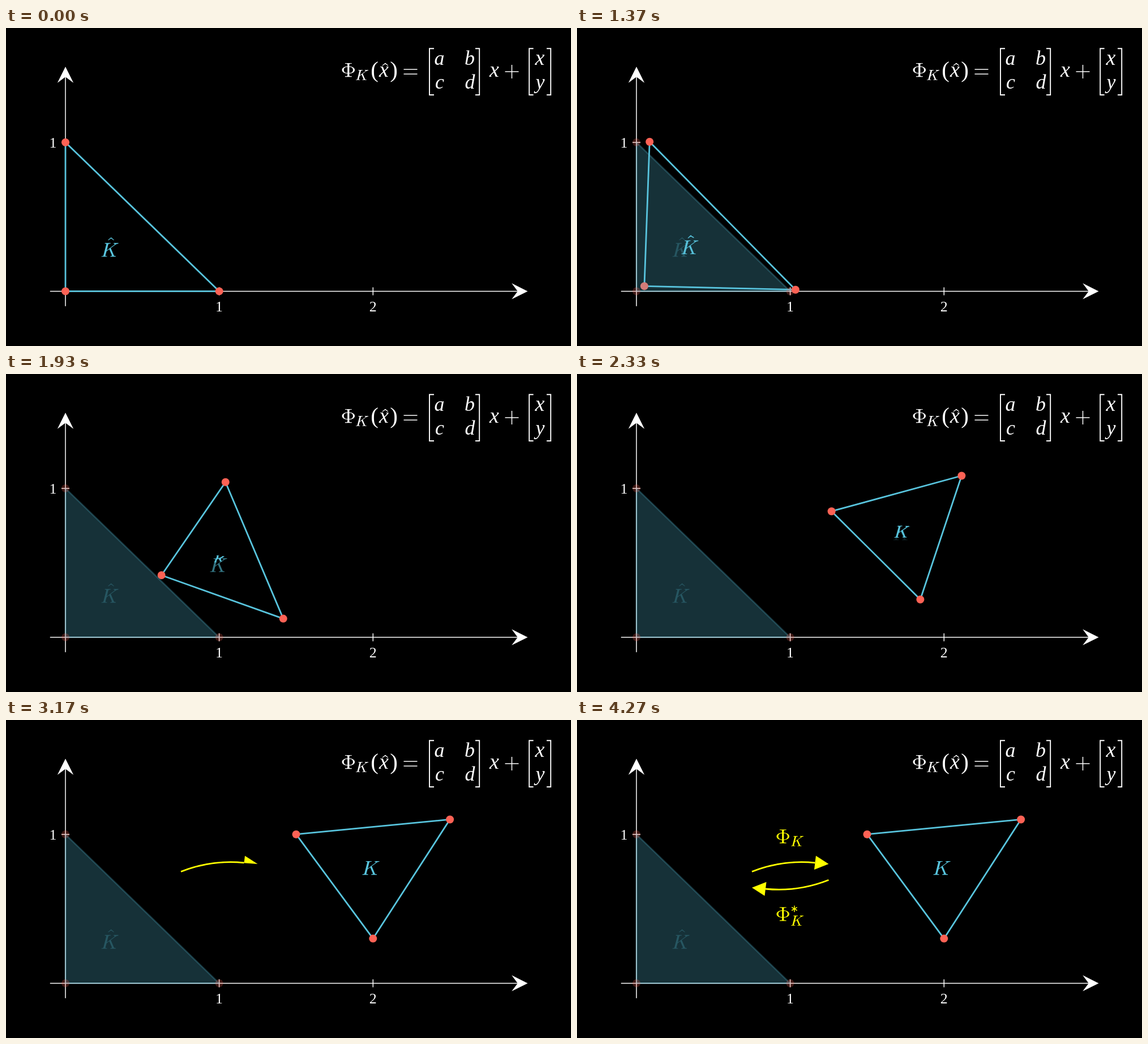
Write an HTML page that moves like this. It is 998 px wide and 561 px high and loops after 9 s.

```html
<!DOCTYPE html>
<html lang="en">
<head>
<meta charset="utf-8">
<title>Affine map of a reference triangle</title>
<style>
  html, body { margin: 0; width: 100%; height: 100%; overflow: hidden; background: #000; }
  svg { display: block; width: 100%; height: 100%; }
  text { font-family: "Liberation Serif", "Times New Roman", serif; fill: #fff; text-anchor: middle; }
  .math text { font-size: 36px; font-style: italic; }
  .math .paren { font-size: 41px; font-style: normal; }
  .num { font-size: 26px; }
  .rule { fill: none; stroke: #fff; stroke-width: 1.5; }
  .bracket { fill: none; stroke: #fff; stroke-width: 1.9; }
  .edge { stroke: #58c4dd; stroke-width: 2.8; stroke-linejoin: round; }
  .dot { fill: #fc6255; }
  .blue { fill: #58c4dd; }
  .white { fill: #fff; }
  .yellow { fill: #ff0; }
  .shaft { fill: none; stroke: #ff0; stroke-width: 2.8; }
  .star { fill: none; stroke: #ff0; stroke-width: 1.5; }
</style>
</head>
<body>
<svg viewBox="0 0 998 561">
  <g id="axes">
    <path class="rule" d="M77.8 464.4H904M105 490.7V86M376.6 457.4v14M648.3 457.4v14M98 201.7h14"/>
    <path class="white" d="M921.5 464.4L893.2 450.2L903.8 464.4L893.2 478.6ZM105 68.3L119.2 96.8L105 86.2L90.8 96.8Z"/>
    <text class="num" x="376.6" y="499.8">1</text>
    <text class="num" x="648.3" y="499.8">2</text>
    <text class="num" x="83" y="210.6">1</text>
  </g>

  <g class="math">
    <path class="white" data-glyph="phi" transform="translate(593.5 86.2)"/>
    <path class="white" data-glyph="k" transform="translate(618 91.8) scale(.73)"/>
    <text class="paren" x="651" y="87.2">(</text>
    <text x="667.5" y="86.2" style="font-size:38px">x</text>
    <path class="white" data-glyph="hat" transform="translate(652.8 95.7)"/>
    <text class="paren" x="685" y="87.2">)</text>
    <path class="rule" d="M702.5 73h24M702.5 81.2h24M881.5 77h24M893.5 65v24"/>
    <path class="bracket" d="M756 36.2H748V118H756M829 36.2H836.2V118H829M931.6 36.2H924.2V118H931.6M955 36.2H962.2V118H955"/>
    <text x="765.5" y="64.6">a</text>
    <text x="819" y="64.6">b</text>
    <text x="766" y="107">c</text>
    <text x="819.5" y="107">d</text>
    <text x="862.5" y="86.2" style="font-size:38px">x</text>
    <text x="943" y="64.6" style="font-size:38px">x</text>
    <text x="943.5" y="107">y</text>
  </g>

  <g id="moving">
    <polygon id="tri" class="edge" fill="none"/>
    <circle class="dot" r="7"/><circle class="dot" r="7"/><circle class="dot" r="7"/>
    <g id="label" class="blue">
      <path id="morph"/>
      <path id="oldK" data-glyph="k"/>
    </g>
  </g>

  <g id="ghost">
    <polygon class="edge blue" fill-opacity=".25" stroke-opacity=".25" points="105,464.4 376.6,464.4 105,201.7"/>
    <g opacity=".25">
      <circle class="dot" r="7" cx="105" cy="464.4"/>
      <circle class="dot" r="7" cx="376.6" cy="464.4"/>
      <circle class="dot" r="7" cx="105" cy="201.7"/>
      <g class="blue" transform="translate(168.5 403.5)">
        <path data-glyph="k"/><path data-glyph="hat"/>
      </g>
    </g>
  </g>

  <g id="maps">
    <path class="shaft" data-glyph="shaft"/>
    <path class="yellow" data-glyph="tip"/>
    <path class="yellow" data-glyph="phi" transform="translate(352.5 217.5)"/>
    <path class="yellow" data-glyph="k" transform="translate(378 222.6) scale(.73)"/>
    <path class="shaft" data-glyph="shaft" transform="rotate(180 376.75 274.9)"/>
    <path class="yellow" data-glyph="tip" transform="rotate(180 376.75 274.9)"/>
    <path class="yellow" data-glyph="phi" transform="translate(352.5 354.5)"/>
    <path class="star" data-glyph="star" transform="translate(384 333.2)"/>
    <path class="yellow" data-glyph="k" transform="translate(378 362.8) scale(.73)"/>
  </g>
</svg>

<script>
const LOOP = 9000, FPS = 30, SAMPLES = 120;
const NS = "http://www.w3.org/2000/svg";
const $ = id => document.getElementById(id);

const GLYPHS = {
  k: "M0 0L.3-1.1C2.5-1.1 3.3-1.2 3.7-2.6L8.6-21.6C8.9-22.9 8.3-23.1 6-23.1L6.3-24.3H16.4L16.1-23.1" +
     "C13.3-23.1 12.5-23 12.1-21.6L9.6-11.2L22.6-21C24-22.2 23.8-23.1 21.6-23.1L21.9-24.3H30.2L29.9-23.1" +
     "C27.5-23 26-22.3 24.1-20.8L16.6-15.2L21.8-2.9C22.5-1.4 23-1.1 25.6-1.1L25.3 0H15.6L15.9-1.1" +
     "C18.3-1.1 18.9-1.6 18.2-3.2L13.9-13.2L9.1-9.6L7.2-2.6C6.9-1.3 7.4-1.1 10.2-1.1L9.9 0Z",
  phi: "M5.4 0V-1.1C9.2-1.1 9.7-1.3 9.7-3.2V-5.6C4-6 0-8.7 0-12.15C0-15.6 4-18.3 9.7-18.7V-21.1" +
       "C9.7-23 9.2-23.2 5.4-23.2V-24.3H17.2V-23.2C13.4-23.2 12.9-23 12.9-21.1V-18.7" +
       "C18.6-18.3 22.6-15.6 22.6-12.15C22.6-8.7 18.6-6 12.9-5.6V-3.2C12.9-1.3 13.4-1.1 17.2-1.1V0Z" +
       "M9.7-6.6V-17.7C5.2-17.3 3.2-15.4 3.2-12.15C3.2-8.9 5.2-7 9.7-6.6Z" +
       "M12.9-6.6C17.4-7 19.4-8.9 19.4-12.15C19.4-15.4 17.4-17.3 12.9-17.7Z",
  hat: "M11.6-29.6L17.2-34.2L22.4-29.6L21.7-28.9L17.1-32.2L12.3-28.9Z",
  star: "M0-5.6V5.6M-4.8-2.8L4.8 2.8M-4.8 2.8L4.8-2.8",
  shaft: "M309 267.5A240 240 0 0 1 420.5 251.8",
  tip: "M444.5 254L422 239.6L419 264Z"
};

const clamp = x => Math.min(1, Math.max(0, x));
const mix = (a, b, t) => a + (b - a) * t;
const sigmoid = x => 1 / (1 + Math.exp(-x));
const EDGE = sigmoid(-5);
const smooth = t => clamp((sigmoid(10 * (clamp(t) - .5)) - EDGE) / (1 - 2 * EDGE));

// Evenly spaced points along an outline
function sample(d) {
  const path = document.createElementNS(NS, "path");
  path.setAttribute("d", d);
  const len = path.getTotalLength();
  return Array.from({ length: SAMPLES + 1 }, (_, i) => {
    const p = path.getPointAtLength(len * i / SAMPLES);
    return [p.x, p.y];
  });
}
const outline = {};
for (const name in GLYPHS) outline[name] = sample(GLYPHS[name]);
const polyline = pts => "M" + pts.map(p => p[0].toFixed(2) + " " + p[1].toFixed(2)).join("L") + "Z";

for (const el of document.querySelectorAll("[data-glyph]")) {
  el.setAttribute("d", GLYPHS[el.dataset.glyph]);
  el.setAttribute("fill-rule", "evenodd");
}

// Show the first part of a path, as a stroke or as a filled piece
function trace(el, part) {
  el.style.display = part > 0 ? "" : "none";
  const name = el.dataset.glyph;
  if (name === "shaft" || name === "star") {
    el.setAttribute("pathLength", 1);
    el.setAttribute("stroke-dasharray", part < 1 ? part + " 2" : "none");
  } else {
    const count = Math.round(part * SAMPLES) + 1;
    el.setAttribute("d", part < 1 ? polyline(outline[name].slice(0, count)) : GLYPHS[name]);
  }
}

const toStage = ([x, y]) => [105 + 271.65 * x, 464.4 - 262.7 * y];
const FROM = [[0, 0], [1, 0], [0, 1]].map(toStage);
const TO = [[1.5, 1], [2, .3], [2.5, 1.1]].map(toStage);
const dots = document.querySelectorAll("#moving circle");
const parts = [...$("maps").children];

function moveTriangle(a) {
  const pts = FROM.map((p, i) => [mix(p[0], TO[i][0], a), mix(p[1], TO[i][1], a)]);
  $("tri").setAttribute("points", pts.join(" "));
  pts.forEach(([x, y], i) => {
    dots[i].setAttribute("cx", x);
    dots[i].setAttribute("cy", y);
  });
  $("label").setAttribute("transform", `translate(${mix(168.5, 629.5, a)} ${mix(403.5, 273.2, a)})`);
  $("oldK").setAttribute("opacity", 1 - a);
  // The hat grows into the new letter while the old letter fades
  const blend = outline.hat.map((p, i) => [mix(p[0], outline.k[i][0], a), mix(p[1], outline.k[i][1], a)]);
  $("morph").setAttribute("d", a < 1 ? polyline(blend) : GLYPHS.k);
}

function draw(ms) {
  const step = Math.floor((ms + 5) * FPS / 1000);
  const sec = step / FPS;
  $("ghost").style.display = step > 0 ? "" : "none";
  moveTriangle(smooth((sec - 1) / 2));
  const turn = (sec - 3) * parts.length;
  parts.forEach((el, i) => trace(el, turn - i <= 0 ? 0 : smooth(turn - i)));
}

const start = performance.now();
function tick() {
  draw((performance.now() - start) % LOOP);
  requestAnimationFrame(tick);
}
tick();
</script>
</body>
</html>
```
